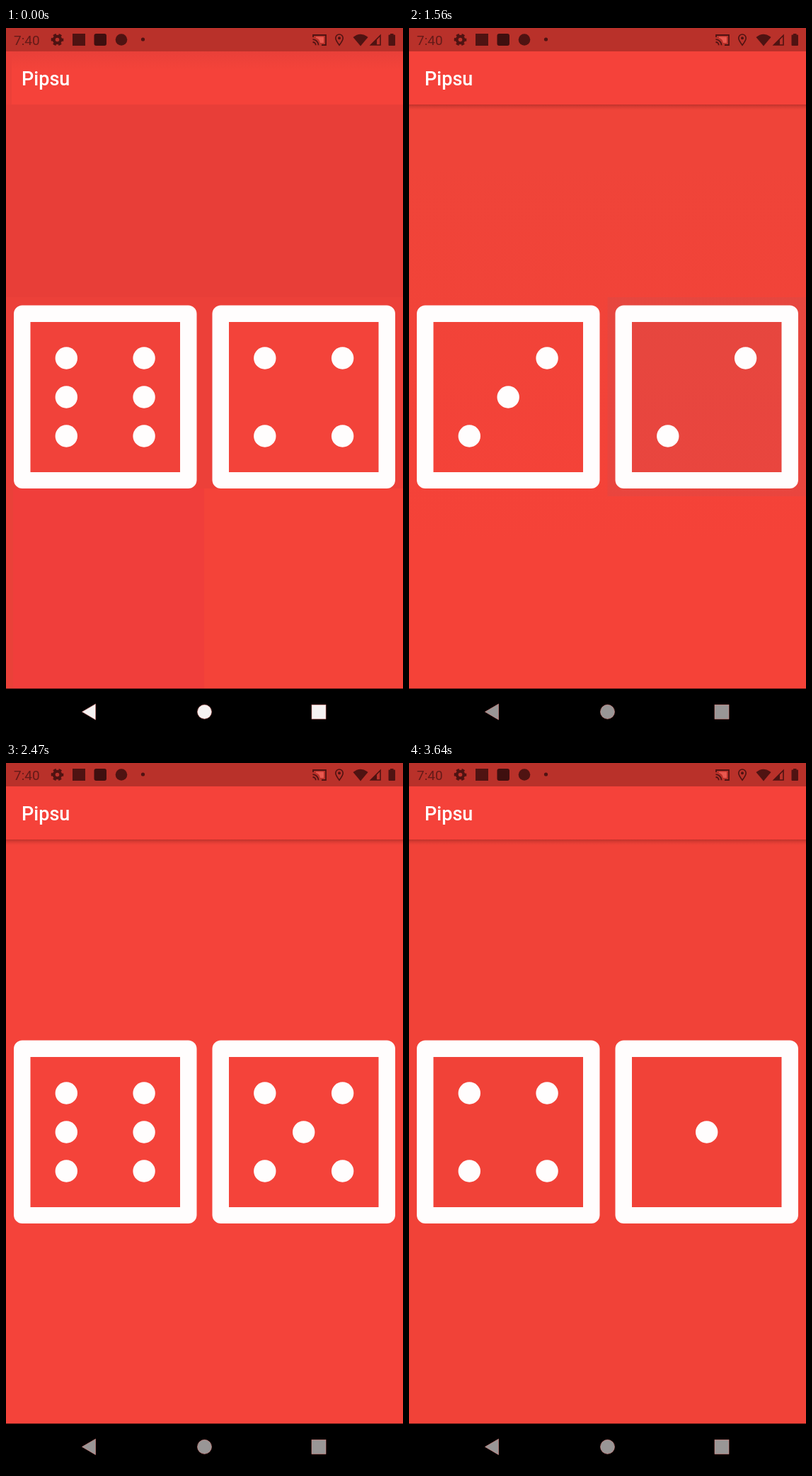
An HTML page for the animation above (3.77 s loop, 561 by 998 pixels).

```html
<!DOCTYPE html>
<html lang="en">
<head>
<meta charset="utf-8">
<title>Dice roller</title>
<style>
  html, body { margin: 0; width: 100%; height: 100%; overflow: hidden; background: #000; }
  svg { display: block; width: 561px; height: 998px; }
  text { font-family: Roboto, "Open Sans", sans-serif; }
</style>
</head>
<body>
<svg viewBox="0 0 561 998" xmlns="http://www.w3.org/2000/svg">
  <defs>
    <linearGradient id="bodyFill" x1="0" y1="0" x2="0" y2="1">
      <stop id="bodyTop" offset="0.1"/>
      <stop id="bodyEnd" offset="0.75"/>
    </linearGradient>
    <linearGradient id="shade" x1="0" y1="0" x2="0" y2="1">
      <stop offset="0" stop-color="#9c2822" stop-opacity=".6"/>
      <stop offset="1" stop-color="#c8362f" stop-opacity="0"/>
    </linearGradient>
    <linearGradient id="barTop" x1="0" y1="0" x2="0" y2="1">
      <stop offset="0" stop-color="#e94039"/>
      <stop offset="1" stop-color="#f4433a"/>
    </linearGradient>
    <clipPath id="button"><rect x="280.5" y="380" width="280.5" height="281"/></clipPath>
  </defs>

  <rect y="108" width="561" height="825" fill="url(#bodyFill)"/>
  <rect y="33" width="561" height="76" fill="#f5423a"/>
  <g id="early">
    <rect y="33" width="561" height="26" fill="url(#barTop)"/>
    <rect y="33" width="8" height="76" fill="#ec4039"/>
    <rect y="108" width="561" height="272" fill="#e83e38"/>
    <rect y="380" width="561" height="271" fill="#ec4039"/>
    <rect x="34" y="414" width="213" height="214" fill="#f1423a"/>
    <rect x="314" y="414" width="213" height="214" fill="#f3433a"/>
    <rect y="650" width="280" height="283" fill="#f03e3b"/>
    <rect y="650" width="10" height="283" fill="#ea4139"/>
    <rect x="280" y="650" width="281" height="283" fill="#f44339"/>
  </g>
  <rect id="shadow" y="108" width="561" height="8" fill="url(#shade)"/>

  <g clip-path="url(#button)"><circle id="splash" cx="389" cy="483" fill="#6a6a84"/></g>
  <g id="dice" fill="#fffdfd"></g>
  <text x="22" y="81" font-size="27" font-weight="500" fill="#fff">Pipsu</text>

  <rect width="561" height="33" fill="#b9312a"/>
  <g fill="#4f1312">
    <text x="11" y="24" font-size="19" fill="#641a18">7:40</text>
    <g transform="translate(72.5 16.5)">
      <circle r="4.8" fill="none" stroke="#4f1312" stroke-width="4"/>
      <circle r="7.3" fill="none" stroke="#4f1312" stroke-width="3" stroke-dasharray="4.2 3.445" stroke-dashoffset="2.1"/>
    </g>
    <rect x="94" y="8" width="18" height="17"/>
    <rect x="124.5" y="8" width="17.5" height="17" rx="3" fill="#3f0f0f"/>
    <circle cx="163" cy="16.5" r="8.3"/>
    <circle cx="193.5" cy="16" r="2.6"/>
    <g fill="none" stroke="#4f1312" stroke-width="1.8">
      <path d="M438 12.5H449V21H444Q443 15 438 14Z" fill="#e9584f" stroke="none"/>
      <path d="M434 13V10H452V24H446M433.5 16.2A8 8 0 0 1 441.5 24.2M433.5 20A4.2 4.2 0 0 1 437.7 24.2"/>
      <path d="M471 24.2C467.5 19.5 465.8 17 465.8 14.2A5.2 5.2 0 0 1 476.2 14.2C476.2 17 474.5 19.5 471 24.2Z" stroke-width="1.6"/>
      <path d="M529 10.5V24H515.5Z" stroke-width="1.6"/>
    </g>
    <circle cx="471" cy="14.2" r="2"/>
    <path d="M490.5 13Q501 4.5 511.5 13L501 25.5Z"/>
    <path d="M524 16V24H515.5Z"/>
    <path d="M543 9.5V8H547.5V9.5H549Q550 9.5 550 10.5V24Q550 25 549 25H541.5Q540.5 25 540.5 24V10.5Q540.5 9.5 541.5 9.5Z"/>
  </g>

  <rect y="932.5" width="561" height="65.5"/>
  <g id="nav" stroke="#e58a86" stroke-width=".6">
    <path d="M107.5 965.3L126.5 954.2V976.4Z"/>
    <circle cx="280.5" cy="965.3" r="10"/>
    <rect x="432" y="955.3" width="20" height="20"/>
  </g>
</svg>
<script>
  const STEP = 130, LOOP = 3770;
  const $ = id => document.getElementById(id);

  // [start ms, left face, right face]
  const rolls = [[0, 6, 4], [650, 6, 2], [1430, 3, 2], [2080, 6, 5], [2860, 6, 6], [3380, 4, 1]];
  // [start ms, radius, opacity]
  const splashes = [
    [0, 0, 0],
    [650, 60, .05], [780, 0, 0],
    [1430, 62, .14], [1560, 300, .08], [1690, 0, 0],
    [2080, 62.5, .16], [2210, 300, .07], [2340, 0, 0],
    [2860, 62.5, .125], [2990, 300, .06], [3120, 0, 0],
    [3380, 62, .13], [3510, 300, .05], [3640, 0, 0]
  ];
  // [start ms, upper colour, lower colour]
  const tones = [
    [0, '#e83e38', '#f44339'], [1300, '#ef4439', '#f54238'],
    [1950, '#f4433a', '#f4433a'], [2600, '#f3423a', '#f3423a'], [3250, '#f14238', '#f14238']
  ];
  // [ms, grey level]
  const navFade = [[0, 245], [650, 183], [1040, 163], [1560, 153], [LOOP, 153]];

  // Pips sit on a 3 by 3 grid, numbered by row
  const faces = ['', '4', '26', '246', '0268', '02468', '023568'];

  const at = (table, t) => table.findLast(row => row[0] <= t);

  function blend(table, t) {
    const i = table.findIndex(row => row[0] > t);
    const [t0, a] = table[i - 1], [t1, b] = table[i];
    return a + (b - a) * (t - t0) / (t1 - t0);
  }

  function die(x, face) {
    const frame = `<path fill-rule="evenodd" d="M${x + 12} 391.5h234.5a12 12 0 0 1 12 12v234.5a12 12 0 0 1-12 12h-234.5a-12 12 0 0 1-12-12v-234.5a12 12 0 0 1 12-12z
      M${x + 23.5} 415v212h211.5v-212z"/>`;
    const pips = [...faces[face]].map(n =>
      `<circle cx="${x + 74.3 + n % 3 * 54.9}" cy="${466 + Math.floor(n / 3) * 55}" r="15.7"/>`);
    return frame + pips.join('');
  }

  let shown = -1;
  function draw(t) {
    if (t === shown) return;
    shown = t;
    const [, left, right] = at(rolls, t);
    const [, radius, alpha] = at(splashes, t);
    const [, top, end] = at(tones, t);
    const grey = Math.round(blend(navFade, t));

    $('dice').innerHTML = die(11, left) + die(291.5, right);
    $('splash').setAttribute('r', radius);
    $('splash').setAttribute('opacity', alpha);
    $('bodyTop').setAttribute('stop-color', top);
    $('bodyEnd').setAttribute('stop-color', end);
    $('early').setAttribute('visibility', t < 1300 ? 'visible' : 'hidden');
    $('shadow').setAttribute('visibility', t < 1300 ? 'hidden' : 'visible');
    $('nav').setAttribute('fill', `rgb(${grey},${grey - 3},${grey - 3})`);
  }

  const start = performance.now();
  function tick() {
    const t = (performance.now() - start) % LOOP;
    draw(Math.floor(t / STEP) * STEP);
    requestAnimationFrame(tick);
  }
  tick();
</script>
</body>
</html>
```
